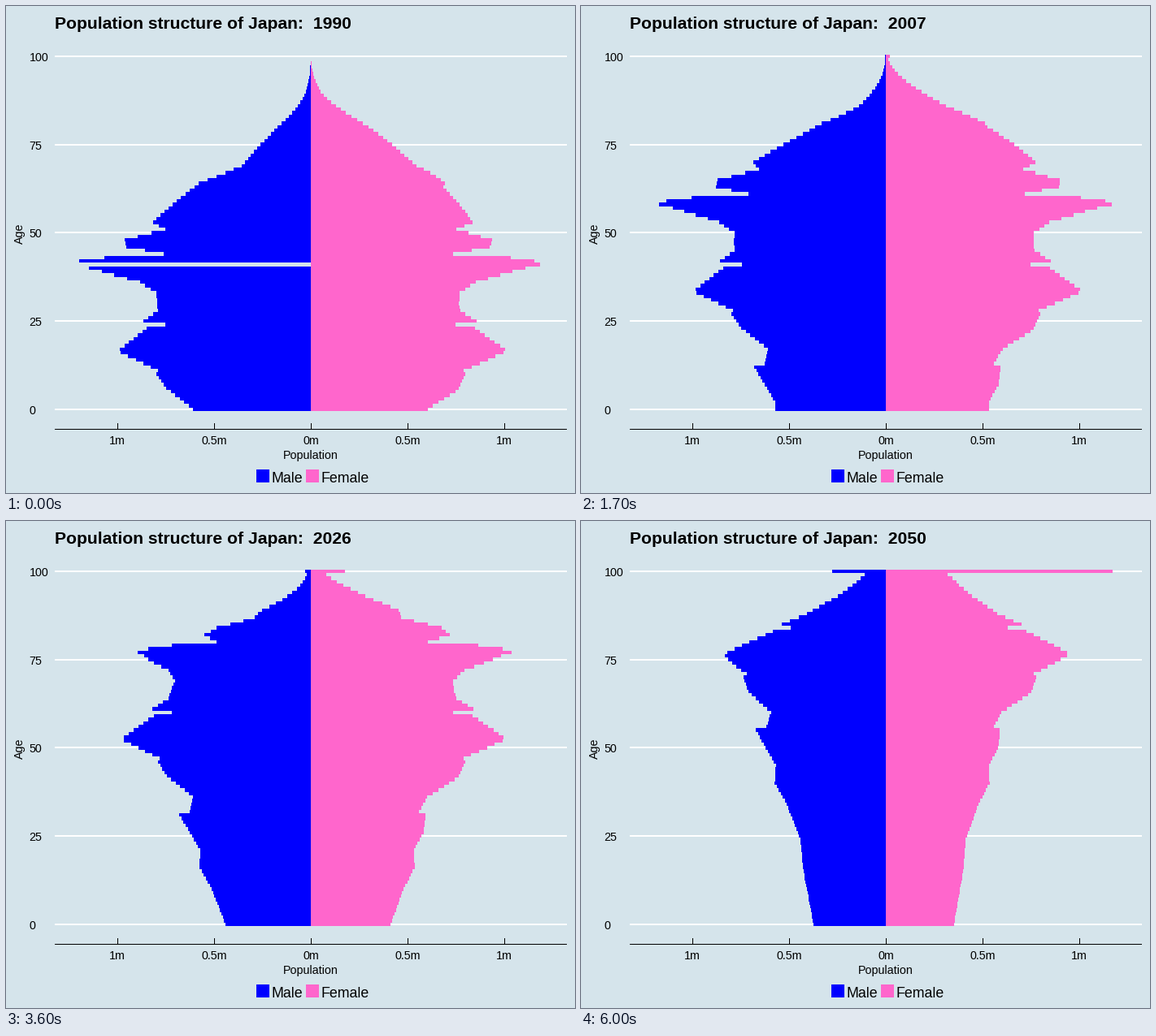
A matplotlib script that plays this animation: 700x600 px, repeating every 6400 ms.

```python
import numpy as np
import matplotlib.pyplot as plt
from matplotlib.animation import FuncAnimation
from matplotlib.patches import Rectangle

plt.rcParams["font.family"] = "Liberation Sans"

W, H, DPI = 700, 600, 100
PAPER, BLUE, PINK = "#d5e4eb", "#0000ff", "#ff66cc"
MID, MILLION = 375, 238             # centre line and pixels per million
LIMIT = 1.2 * MILLION               # longer bars are not drawn
BASE_Y, STEP = 496.9, 4.35          # age 0 and pixels per year of age
START, END, HOLD = 1990, 2050, 3
AGES = np.arange(115)

# Turning points of the cohort size: year of birth, pixels
SIZE = [(1885, 40), (1900, 54), (1910, 92), (1921, 110), (1926, 161),
        (1937, 204), (1939, 186), (1942, 236), (1944, 232), (1946, 184),
        (1947, 258), (1948, 289), (1949, 296), (1950, 276), (1954, 212),
        (1957, 191), (1962, 189), (1965, 206), (1966, 179), (1967, 202),
        (1973, 235), (1974, 234), (1979, 188), (1980, 190), (1984, 178),
        (1990, 145), (1994, 149), (1995, 162), (2005, 136), (2010, 137),
        (2016, 122), (2026, 105), (2034, 102), (2050, 89)]
# Women per man at birth or settlement
SHARE = [(1900, 1.2), (1921, 1.34), (1927, 1.05), (1936, 1), (1942, .955),
         (1960, .962), (1967, 1), (1973, 1.017), (1980, 1), (1985, 1.03),
         (1990, .99), (1995, .87), (2000, .93), (2050, .943)]


def curve(x, points):
    return np.interp(x, *zip(*points))


def alive(age, born, rate, aging, gain, bend):
    """Gompertz survival; mortality falls with each later cohort."""
    d = born - 1950
    hazard = rate * np.exp(-gain * d - bend * d ** 2)
    return np.exp(-hazard * np.exp(aging * (age - 50)))


def bars(people):
    """Bar lengths for ages 0 to 99 and everyone older."""
    lengths = np.append(people[:100], people[100:].sum())
    return np.round(np.where(lengths > LIMIT, 0, lengths))


def pyramid(year):
    born = year - AGES
    men = curve(born, SIZE)
    women = men * curve(born, SHARE)
    return (bars(men * alive(AGES, born, .0285, .09, .021, .00012)),
            bars(women * alive(AGES, born, .0091, .1, .027, .00006)))


fig = plt.figure(figsize=(W / DPI, H / DPI), dpi=DPI, facecolor=PAPER)
ax = fig.add_axes([0, 0, 1, 1])
ax.axis("off")


def box(x, y, w, h, color):
    ax.add_patch(Rectangle((x, y), w, h, fc=color, ec="none", lw=0,
                           antialiased=False))


def label(x, y, text, px, **kw):
    return ax.text(x, y, text, fontsize=px * 72 / DPI, color="black",
                   va="baseline", **kw)


for age in range(0, 101, 25):
    y = round(BASE_Y - STEP * age)
    box(60, y - 1, 630, 2, "white")
    label(28.5, y + 6, str(age), 14.2)

box(60, 521, 630, 1, "black")
for i, text in enumerate(["1m", "0.5m", "0m", "0.5m", "1m"]):
    x = MID + (i - 2) * MILLION // 2
    box(x, 514, 1, 7, "black")
    label(x, 540, text, 14.2, ha="center")

label(374.5, 558, "Population", 14.2, ha="center")
label(21, 280, "Age", 14.2, ha="center", rotation=90, rotation_mode="anchor")
for x, color, text in [(308, BLUE, "Male"), (369, PINK, "Female")]:
    box(x, 571, 16, 16, color)
    label(x + 18.6, 587, text, 17.7)
title = label(59.5, 28, "", 21.15, weight="bold")

edges = BASE_Y + STEP / 2 - STEP * np.arange(102)


def side(color):
    return ax.stairs(np.full(101, MID), edges, baseline=MID, fill=True,
                     orientation="horizontal", color=color, lw=0,
                     antialiased=False, zorder=3)


left, right = side(BLUE), side(PINK)
ax.set(xlim=(0, W), ylim=(H, 0))


def draw(i):
    year = min(START + i, END)
    men, women = pyramid(year)
    left.set_data(values=MID - men)
    right.set_data(values=MID + women)
    title.set_text(f"Population structure of Japan:  {year}")
    return left, right, title


anim = FuncAnimation(fig, draw, frames=END - START + 1 + HOLD, interval=100,
                     repeat=True, repeat_delay=0)
plt.show()
```
